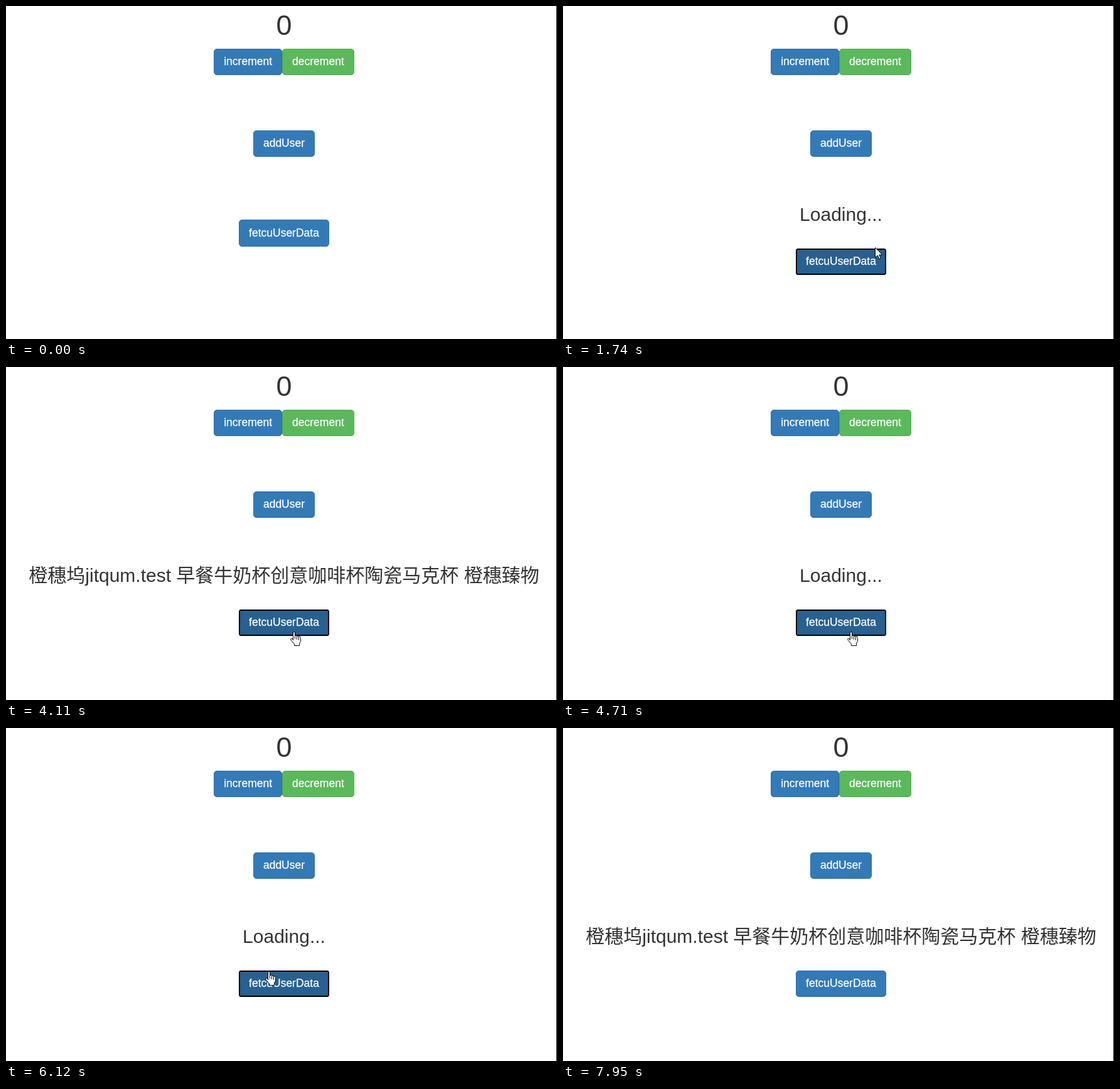
Write an HTML page that moves like this. It is 878 px wide and 530 px high and loops after 8080 ms.

```html
<!DOCTYPE html>
<html lang="zh-CN">
<head>
<meta charset="utf-8">
<title>Counter demo</title>
<style>
  html, body { margin: 0; width: 100%; height: 100%; overflow: hidden; background: #fff; }
  body { position: relative; color: #333; font-family: "Liberation Sans", Arial, "Noto Sans CJK SC", "Noto Sans CJK", sans-serif; }
  .row { position: absolute; left: 0; width: 886px; display: flex; justify-content: center; white-space: pre; }
  .count { top: 5px; font-size: 45px; line-height: 51px; }
  .result { top: 315px; font-size: 30px; line-height: 33px; }
  .btn {
    box-sizing: border-box; height: 42.5px; padding: 9.3px 15px 0;
    border: 1px solid #2e6da4; border-radius: 5px; background: #337ab7;
    color: #fff; font-size: 17.5px; line-height: 20px; -webkit-text-stroke: .25px #fff;
  }
  .green { background: #5cb85c; border-color: #4cae4c; }
  .hover { background: #286090; border-color: #204d74; }
  .focus { background: #286090; border-color: #000; border-radius: 3px; box-shadow: inset 0 0 0 1px #000; }
  .press { background: #204d74; }
  .edge { position: absolute; left: 877px; top: 0; width: 1px; height: 530px; background: #000; }
  svg { position: absolute; left: 0; top: 0; fill: #fff; stroke: #000; stroke-linejoin: round; }
</style>
</head>
<body>
<div class="row count">0</div>
<div class="row" style="top:67.9px"><div class="btn">increment</div><div class="btn green">decrement</div></div>
<div class="row" style="top:197.9px"><div class="btn">addUser</div></div>
<div class="row result" id="result"></div>
<div class="row" id="fetchRow"><div class="btn" id="fetchBtn">fetcuUserData</div></div>
<div class="edge"></div>
<svg width="878" height="530"><path id="cursor"/></svg>
<script>
const LOOP = 8080, PRESS = 90, WAIT = 2030, BLUR = 7950;
const ENTER = 190, LEAVE = 7050;
const clicks = [850, 4390];
const PRODUCT = '橙穗坞jitqum.test 早餐牛奶杯创意咖啡杯陶瓷马克杯 橙穗臻物';
const [result, fetchRow, fetchBtn, cursor] =
  ['result', 'fetchRow', 'fetchBtn', 'cursor'].map(id => document.getElementById(id));

const ARROW = 'M.5 .5V16.5L4.3 12.9 6.8 18.6 9.2 17.5 6.8 12H11.8Z';
const KNUCKLE = 'v4v-4q0-1.5 1.5-1.5t1.5 1.5v1';
const HAND = 'M4.5 14V2q0-1.5 1.5-1.5t1.5 1.5V7.5' + KNUCKLE.repeat(3) +
  'V15.5L14.5 19V22.5H6.5V20L1 13.5Q0 11.5 2 11T4.5 14Z';

// Pointer stops; it eases to each one and rests there.
const stops = [
  { start: ENTER, end: 610, x: 455, y: 370 },
  { start: 1190, end: 1310, x: 563, y: 348 },
  { start: 1470, end: 1890, x: 470, y: 398 },
  { start: 2350, end: 2440, x: 514, y: 346 },
  { start: 2970, end: 3300, x: 640, y: 358 },
  { start: 3600, end: 3900, x: 460, y: 421 },
  { start: 5310, end: 5370, x: 425, y: 381 },
  { start: 5610, end: 5790, x: 420, y: 387 },
  { start: 6770, end: LEAVE, x: 159, y: 522 }
];

function pointerAt(t) {
  let x = 121, y = 512;
  for (const s of stops) {
    const p = Math.min(1, Math.max(0, (t - s.start) / (s.end - s.start)));
    const k = p * p * (3 - 2 * p);
    x += (s.x - x) * k;
    y += (s.y - y) * k;
  }
  return [Math.round(x), Math.round(y)];
}

const within = (t, a, b) => t >= a && t < b;

function draw(t) {
  const [x, y] = pointerAt(t);
  const visible = within(t, ENTER, LEAVE);
  const pressed = clicks.some(c => within(t, c, c + PRESS));
  const loading = clicks.some(c => within(t, c + PRESS, c + PRESS + WAIT));
  const focused = within(t, clicks[0], BLUR);
  const moved = t >= clicks[0] + PRESS;
  const top = moved ? 385.9 : 340.4;
  const over = visible && within(x, 371, 515) && within(y, top, top + 42.5);

  result.textContent = loading ? 'Loading...' : moved ? PRODUCT : '';
  fetchRow.style.top = top + 'px';
  fetchBtn.className = 'btn' + (focused ? ' focus' : over ? ' hover' : '') + (pressed ? ' press' : '');

  // The hand stays until the pointer moves, even though the button has slid away.
  const hand = over || within(t, clicks[0], stops[1].start);
  cursor.setAttribute('d', !visible ? '' : hand ? HAND : ARROW);
  cursor.setAttribute('transform', `translate(${hand ? x - 7 : x} ${y})`);
}

function tick() {
  draw(performance.now() % LOOP);
  requestAnimationFrame(tick);
}
tick();
</script>
</body>
</html>
```
